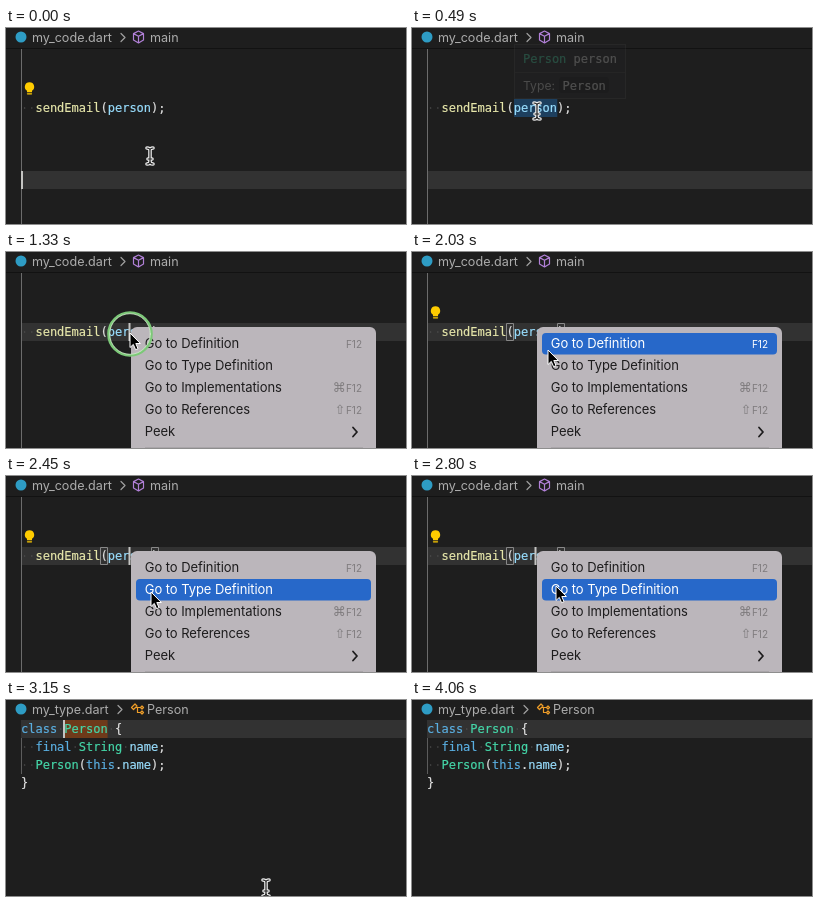
An HTML page that plays this animation: 400 px wide and 196 px high, repeating every 4.2 s.

```html
<!DOCTYPE html>
<html lang="en">
<head>
<meta charset="utf-8">
<title>Go to Type Definition</title>
<style>
  html, body { margin: 0; width: 100%; height: 100%; overflow: hidden; background: #1e1e1e; }
  svg { display: block; width: 100%; height: 100%; }
  text { white-space: pre; }
  .code { font: 12px "DejaVu Sans Mono", "Liberation Mono", monospace; color: #dedede; }
  .code, .code tspan { fill: currentColor; stroke: currentColor; stroke-width: .2; }
  .ui { font: 12.6px Inter, "Liberation Sans", sans-serif; fill: #acacac; }
  .menu { font: 13px Inter, "Liberation Sans", sans-serif; letter-spacing: -.06px; fill: #1d1c1d; }
  .key { font: 10px Inter, "DejaVu Sans", sans-serif; fill: #7f7c7e; text-anchor: end; }
  .glyph { font: 13px "DejaVu Sans", sans-serif; fill: #7f7c7e; text-anchor: end; }
  .on text { fill: #fff; }
  .fn { color: #e6e6aa; } .var { color: #98ddfd; } .type { color: #45d6a8; } .kw { color: #5aaee0; }
  .line { fill: none; stroke-linecap: round; stroke-linejoin: round; }
</style>
</head>
<body>
<svg viewBox="0 0 400 196" preserveAspectRatio="none">
  <rect width="400" height="196" fill="#1e1e1e"/>
  <rect id="row" x="15" width="385" height="18" fill="#323232"/>

  <g id="call">
    <rect y="20" width="400" height="1" fill="#121212"/>
    <rect x="15" y="21" width="1" height="175" fill="#6c6c6c"/>
    <rect id="word" x="102" y="71" width="43.3" height="18" fill="#1d3f5e"/>
    <g id="callCode"></g>
    <g id="hints">
      <path d="M94.500 71.500h7v17h-7zM145.500 71.500h7v17h-7z" fill="none" stroke="#888"/>
    </g>
    <g id="bulb">
      <path d="M23.500 54.200a4.600 4.600 0 0 1 2.500 8.500v1.500h-5v-1.500A4.600 4.600 0 0 1 23.500 54.200z" fill="#ffcc00"/>
      <path class="line" d="M21.500 65.800h4" stroke="#ffcc00" stroke-width="1.300"/>
    </g>
  </g>

  <g id="type">
    <rect x="15" y="38" width="1" height="36" fill="#5c5c5c"/>
    <rect id="range" x="58.300" y="20" width="43.300" height="18" fill="#6e3a1a"/>
    <g id="typeCode"></g>
  </g>

  <rect id="caret" width="2" height="18" fill="#c4c4c2"/>

  <circle cx="15" cy="9" r="5.500" fill="#2e9cc4"/>
  <g id="crumbCall">
    <text class="ui" x="26" y="14">my_code.dart</text>
    <path class="line" d="M115 5.500l4 4-4 4" stroke="#a0a0a0" stroke-width="1.200"/>
    <path class="line" d="M132.500 3l5 2.600v6.400l-5 3-5-3V5.600zM127.500 5.600l5 2.700 5-2.700M132.500 8.300v6.700" stroke="#b180d7" stroke-width="1.200"/>
    <text class="ui" x="144" y="14">main</text>
  </g>
  <g id="crumbType">
    <text class="ui" x="26" y="14">my_type.dart</text>
    <path class="line" d="M112 5.500l4 4-4 4" stroke="#a0a0a0" stroke-width="1.200"/>
    <path class="line" d="M125.500 7.500l3.500-3.500 2 2-3.500 3.500zM130 7.500h4M131.500 7.500v5h2.500M134.500 7.500l1.500-1.500 1.500 1.500-1.500 1.500zM134.500 12.500l1.500-1.500 1.500 1.500-1.500 1.500z" stroke="#ee9d28" stroke-width="1.200"/>
    <text class="ui" x="141" y="14">Person</text>
  </g>

  <g id="hover">
    <rect x="102.500" y="16.500" width="111" height="54" fill="#252526" stroke="#454545"/>
    <path d="M103 44.500h110" stroke="#3c3c3c"/>
    <text class="code" x="111" y="35"><tspan class="type">Person</tspan> person</text>
    <text class="ui" x="111" y="61.500" style="font-size:12.2px;fill:#cccccc">Type:</text>
    <rect x="147" y="49" width="50" height="16" rx="3" fill="#1a1a1b"/>
    <text class="code" x="150.500" y="61.500">Person</text>
  </g>

  <g id="menu">
    <rect x="125" y="75" width="245" height="140" rx="6" fill="#bbb6bb"/>
    <path d="M139 195.500h218" stroke="#a9a5a9"/>
    <rect id="pick" x="130" width="235" height="21.500" rx="4" fill="#2768c9"/>
    <g id="items"></g>
    <path class="line" d="M347 175.500l4 4.500-4 4.500" stroke="#1d1c1d" stroke-width="1.800"/>
  </g>

  <g id="ring" class="line">
    <circle cx="124" cy="82" r="21.500" stroke="#7cc878" stroke-width="2.600"/>
    <circle cx="124" cy="82" r="20.300" stroke="#d6efd0" stroke-width=".8"/>
  </g>

  <g id="beam" class="line">
    <path id="beamBack" stroke="#f0f0f0" stroke-width="3.600"/>
    <path id="beamFront" stroke="#222" stroke-width="1.200"/>
  </g>
  <path id="arrow" d="M0 0V14.500L3.300 11.400 5.600 16.700 8 15.700 5.800 10.500H10.400Z" fill="#000" stroke="#fff" stroke-width="1" stroke-linejoin="round"/>
</svg>

<script>
const LOOP = 4200, STEP = 70, CHAR = 7.224, LEFT = 15;
const $ = id => document.getElementById(id);

// Each part is [class, text]; columns listed in dots get a whitespace mark.
function codeLine(host, top, indent, parts, dots) {
  const spans = parts.map(([cls, s]) => `<tspan class="${cls}">${s}</tspan>`).join('');
  const marks = dots.map(c =>
    `<circle cx="${LEFT + (c + .5) * CHAR}" cy="${top + 9}" r=".8" fill="#505050"/>`).join('');
  $(host).innerHTML += marks +
    `<text class="code" x="${LEFT + indent * CHAR}" y="${top + 13}">${spans}</text>`;
}

codeLine('callCode', 71, 2, [['fn', 'sendEmail'], ['', '('], ['var', 'person'], ['', ');']], [0, 1]);
codeLine('typeCode', 20, 0, [['kw', 'class '], ['type', 'Person'], ['', ' {']], [5, 12]);
codeLine('typeCode', 38, 2, [['kw', 'final '], ['type', 'String '], ['var', 'name'], ['', ';']], [0, 1, 7, 14]);
codeLine('typeCode', 56, 2, [['type', 'Person'], ['', '('], ['kw', 'this'], ['', '.'], ['var', 'name'], ['', ');']], [0, 1]);
codeLine('typeCode', 74, 0, [['', '}']], []);

const entries = [
  ['Go to Definition', 'F12'],
  ['Go to Type Definition', ''],
  ['Go to Implementations', 'F12', '⌘'],
  ['Go to References', 'F12', '⇧'],
  ['Peek', '']
];
$('items').innerHTML = entries.map(([label, key, mod = ''], i) => {
  const y = 96 + i * 22;
  return `<g><text class="menu" x="138.800" y="${y}">${label}</text>` +
    `<text class="key" x="356" y="${y}">${key}</text>` +
    `<text class="glyph" x="339.500" y="${y}">${mod}</text></g>`;
}).join('');
const items = [...$('items').children];

const beamPath = 'M-3-8Q0-8 0-5.500V5.500Q0 8-3 8M3-8Q0-8 0-5.500M0 5.500Q0 8 3 8M-2 3H2';
$('beamBack').setAttribute('d', beamPath);
$('beamFront').setAttribute('d', beamPath);

// time, x, y
const path = [
  [0, 144, 128], [70, 143, 125], [210, 133, 101], [350, 126, 84], [490, 125, 83], [560, 124, 82],
  [1190, 124, 82], [1260, 124, 81], [1680, 124, 81], [1820, 128, 86], [2030, 136, 98],
  [2240, 141, 108], [2450, 145, 116], [2590, 145, 115], [2800, 144, 110],
  [2870, 147, 112], [3010, 205, 150], [3150, 260, 188], [3430, 260, 188], [3640, 262, 212]
];

function pointer(t) {
  const i = path.findIndex(p => p[0] > t);
  if (i < 0) return path[path.length - 1].slice(1);
  const [t0, x0, y0] = path[i - 1], [t1, x1, y1] = path[i];
  const k = (t - t0) / (t1 - t0);
  return [x0 + (x1 - x0) * k, y0 + (y1 - y0) * k];
}

const within = (t, a, b) => t >= a && t < b;
const ramp = (t, a, b) => Math.min(1, Math.max(0, (t - a) / (b - a)));
const alpha = (id, v) => $(id).setAttribute('opacity', +v);
const set = (id, attrs) => {
  for (const k in attrs) $(id).setAttribute(k, attrs[k]);
};

function render(t) {
  const opened = t >= 3080, clicked = t >= 1260;
  alpha('call', !opened);
  alpha('crumbCall', !opened);
  alpha('type', opened);
  alpha('crumbType', opened);

  const top = opened ? 20 : clicked ? 71 : 143;
  set('row', { y: top });
  set('caret', { x: opened ? 57 : clicked ? 122.5 : 15, y: top });
  alpha('caret', t < 350 || within(t, 840, 1750) || within(t, 2310, 3570));

  alpha('bulb', t < 210 || t >= 1540);
  alpha('hints', t >= 1540);
  alpha('word', within(t, 490, 1260));
  alpha('hover', clicked ? 0 : ramp(t, 420, 700));
  alpha('range', t < 3360);

  alpha('menu', clicked ? 1 - ramp(t, 2870, 3010) : 0);
  const pick = within(t, 1820, 2170) ? 0 : t >= 2170 ? 1 : -1;
  alpha('pick', pick >= 0);
  set('pick', { y: 81 + Math.max(0, pick) * 22 });
  items.forEach((g, i) => g.classList.toggle('on', i === pick));

  alpha('ring', within(t, 1190, 1400));

  const arrow = within(t, 1260, 3010);
  const at = `translate(${pointer(t)})`;
  set('arrow', { transform: at });
  set('beam', { transform: at });
  alpha('arrow', arrow);
  alpha('beam', !arrow);
}

const start = performance.now();
function tick() {
  const t = (performance.now() - start) % LOOP;
  render(Math.floor(t / STEP) * STEP);
  requestAnimationFrame(tick);
}
tick();
</script>
</body>
</html>
```
